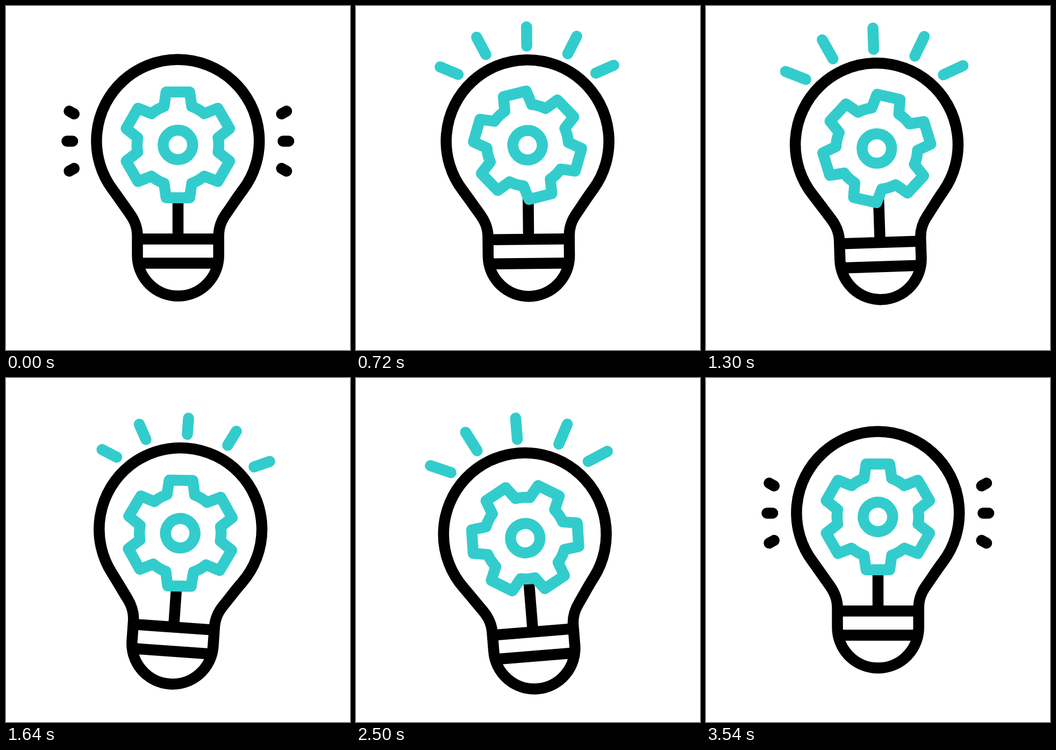
An HTML page that plays this animation: 640x640 px, repeating every 3600 ms.

```html
<!DOCTYPE html>
<html lang="en">
<head>
<meta charset="utf-8">
<title>Idea bulb</title>
<style>
  html, body { margin: 0; width: 100%; height: 100%; overflow: hidden; background: #fff; }
  svg { display: block; width: 100vw; height: 100vh; }
  .ink, .glow { fill: none; stroke-width: 20.5; }
  .ink { stroke: #000; }
  .glow { stroke: #33cccc; stroke-linejoin: round; }
  .cap { stroke-linecap: round; }
  #teeth { fill: #fff; }
</style>
</head>
<body>
<svg viewBox="0 0 640 640">
  <g id="bulb">
    <g id="dashes"></g>
    <g id="rays"></g>
    <g class="ink">
      <path d="M320 338V433M245 433.5H396M245 478.5H396"/>
      <path d="M244.5 464V428C244.5 412 240 400 230 386C220 372 209 356 198.8 342A151.4 151.4 0 1 1 440.8 342C430 356 420 372 410 386C400 400 395.7 412 395.7 428V464A75.6 75.6 0 0 1 244.5 464Z"/>
    </g>
    <g id="gear" class="glow">
      <path id="teeth"/>
      <circle r="27.4"/>
    </g>
  </g>
</svg>
<script>
const LOOP = 3600;
const BEATS = [0, 400, 1000, 1800, 2600, 3400];
const TILT = 5, DROP = 46;
const { PI, sin, cos, min, max, abs } = Math;
const $ = id => document.getElementById(id);
const rad = deg => deg * PI / 180;

// Smooth 0 to 1 between times a and b.
const ease = (t, a, b) => (1 - cos(PI * min(1, max(0, (t - a) / (b - a))))) / 2;

// The bulb tilts to the other side on every beat and is lowest there.
function rock(t) {
  const last = BEATS.length - 1;
  const tilt = i => i <= 0 || i >= last ? 0 : i % 2 ? TILT : -TILT;
  return BEATS.slice(1).reduce(
    (sum, b, i) => sum + (tilt(i + 1) - tilt(i)) * ease(t, BEATS[i], b), 0);
}

function bob(t) {
  if (t < BEATS[1]) return DROP * ease(t, 0, BEATS[1]);
  if (t > 3000) return 0;
  const i = BEATS.findIndex(b => b > t);
  const p = (t - BEATS[i - 1]) / (BEATS[i] - BEATS[i - 1]);
  return DROP * cos(PI * p) ** 2;
}

const turn = t => -36 * ease(t, 520, 1000) - 30 * ease(t, 1000, 1800)
  - 24 * ease(t, 1800, 2600) - 30 * ease(t, 2600, 3420);

function rayLength(t) {
  if (t < 600) return ease(t, 400, 600);
  return t < 2600 ? 0.775 + 0.225 * cos(PI * (t - 600) / 200) : 1;
}

function gearPath() {
  const foot = [25.8, -71.5], tip = [21.9, -98.4];
  const at = ([x, y], side, k) => {
    const c = cos(rad(60 * k)), s = sin(rad(60 * k));
    return `${x * side * c - y * s} ${x * side * s + y * c}`;
  };
  let d = "";
  for (let k = 0; k < 6; k++) {
    d += (k ? "A76 76 0 0 1 " : "M") + at(foot, -1, k)
      + "L" + at(tip, -1, k) + "L" + at(tip, 1, k) + "L" + at(foot, 1, k);
  }
  return d + "A76 76 0 0 1 " + at(foot, -1, 0) + "Z";
}

// A stroke from (x, y) outwards; the angle is measured from straight up.
function addStroke(group, style, x, y, angle, length) {
  const el = document.createElementNS("http://www.w3.org/2000/svg", "line");
  el.setAttribute("class", style + " cap");
  $(group).append(el);
  return { el, x, y, dx: length * sin(rad(angle)), dy: -length * cos(rad(angle)) };
}

function trim({ el, x, y, dx, dy }, from, to) {
  el.style.display = to - from > 0.002 ? "" : "none";
  el.setAttribute("x1", x + dx * from);
  el.setAttribute("y1", y + dy * from);
  el.setAttribute("x2", x + dx * to);
  el.setAttribute("y2", y + dy * to);
}

$("teeth").setAttribute("d", gearPath());
const rays = [addStroke("rays", "glow", 320, 74, 0, 51)];
const dashes = [];
for (const side of [-1, 1]) {
  rays.push(addStroke("rays", "glow", 320 + 76.2 * side, 89, 27.6 * side, 52));
  rays.push(addStroke("rays", "glow", 320 + 128 * side, 125.6, 66.8 * side, 52));
  for (let k = -1; k <= 1; k++) {
    const x = 319.75 + (195.75 - 2.75 * abs(k)) * side;
    dashes.push(addStroke("dashes", "ink", x, 251.4 + 50.7 * k, (90 + 29 * k) * side, 10.5));
  }
}

function draw(t) {
  $("bulb").setAttribute("transform", `translate(0 ${bob(t)}) rotate(${rock(t)} 320 320)`);
  $("gear").setAttribute("transform", `translate(319.8 258.4) rotate(${turn(t)})`);
  const shown = 1 - ease(t, 0, 220) + ease(t, 3200, 3500);
  dashes.forEach(dash => trim(dash, 0, shown));
  const from = ease(t, 2600, 3000), to = rayLength(t);
  rays.forEach(ray => trim(ray, from, to));
}

const start = performance.now();
function tick() {
  draw((performance.now() - start) % LOOP);
  requestAnimationFrame(tick);
}
tick();
</script>
</body>
</html>
```
